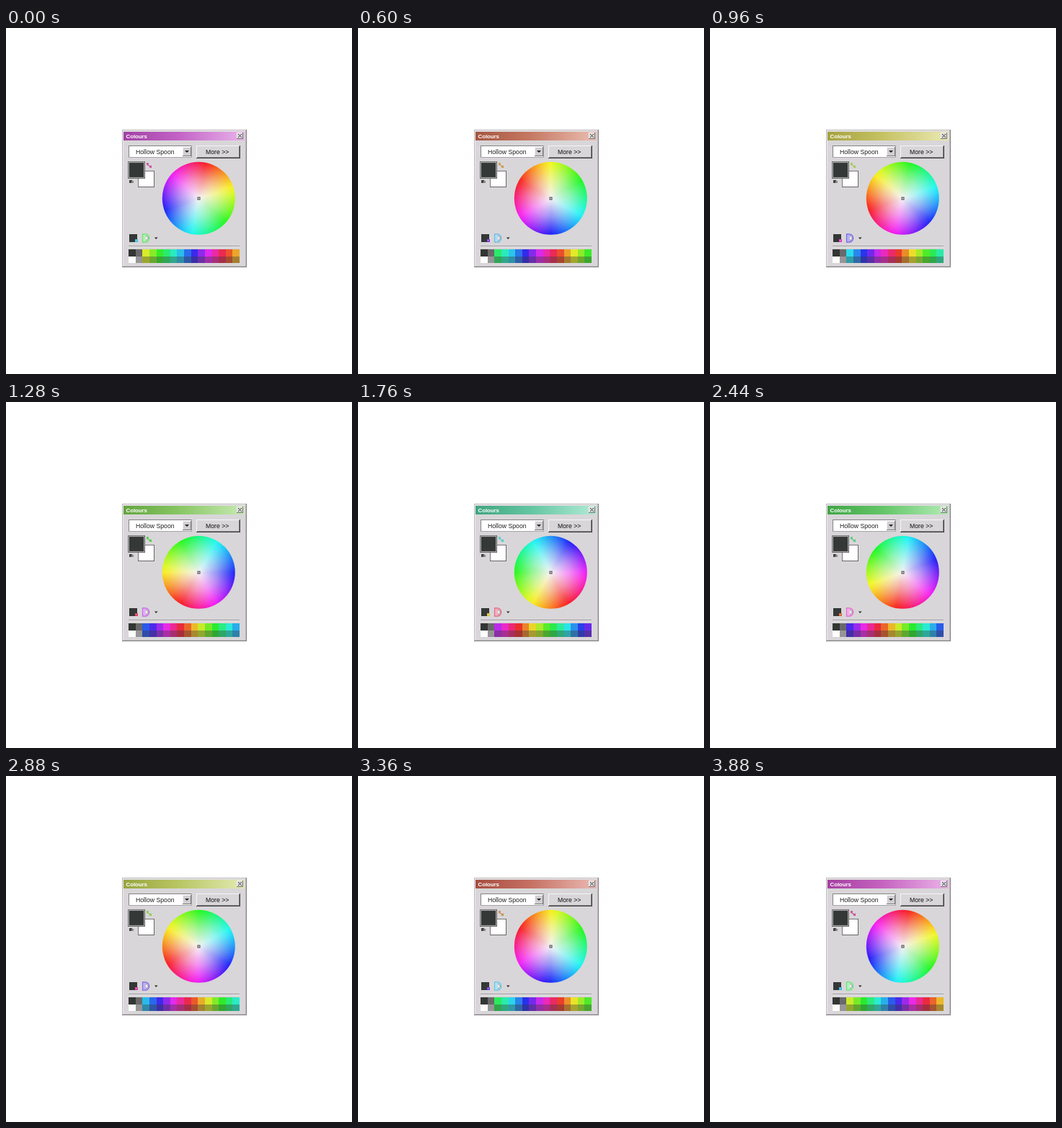
Write an HTML page with a canvas that moves like this. It is 480 by 480 pixels and loops after 3920 ms.

```html
<!DOCTYPE html>
<html lang="en">
<head>
<meta charset="utf-8">
<title>Colour palette</title>
<style>
html, body { margin: 0; width: 100%; height: 100%; overflow: hidden; background: #fff; }
canvas { display: block; }
</style>
</head>
<body>
<canvas id="stage" width="480" height="480"></canvas>
<script>
const ctx = document.getElementById('stage').getContext('2d');
const STEP = 40, STEPS = 98;
const FACE = '#d8d6d8', DARK = '#343837';
const FONT = '"Liberation Sans", Arial, sans-serif';

const hsl = (h, s, l) => `hsl(${h % 360} ${s}% ${l}%)`;

function rect(x, y, w, h, color) {
  ctx.fillStyle = color;
  ctx.fillRect(x, y, w, h);
}

function box(x, y, w, h, fill, topLeft, bottomRight) {
  rect(x, y, w, h, bottomRight);
  rect(x, y, w - 1, h - 1, topLeft);
  rect(x + 1, y + 1, w - 2, h - 2, fill);
}

function label(text, x, y, size, color, weight = 'normal') {
  ctx.font = `${weight} ${size}px ${FONT}`;
  ctx.fillStyle = color;
  ctx.fillText(text, x, y);
}

function polygon(color, ...points) {
  ctx.fillStyle = color;
  ctx.beginPath();
  for (const [x, y] of points) ctx.lineTo(x, y);
  ctx.fill();
}

function stroke(color, width, ...points) {
  ctx.strokeStyle = color;
  ctx.lineWidth = width;
  ctx.beginPath();
  for (const [x, y] of points) ctx.lineTo(x, y);
  ctx.stroke();
}

function drawWindow(shift) {
  rect(161, 141, 173, 191, '#858285');
  rect(161, 141, 172, 190, '#bdbabd');
  rect(162, 142, 170, 188, '#eceaec');
  rect(163, 143, 169, 187, FACE);

  const hue = 233 + shift;
  const bar = ctx.createLinearGradient(163, 0, 331, 0);
  bar.addColorStop(0, hsl(hue, 44, 45));
  bar.addColorStop(0.45, hsl(hue, 46, 58));
  bar.addColorStop(1, hsl(hue, 58, 81));
  rect(163, 144, 168, 12, bar);
  label('Colours', 166.5, 153.4, 7.8, '#fff', 'bold');

  box(320, 145, 9, 9, FACE, '#f4f2f4', '#777');
  stroke('#444', 1, [322, 147], [327, 152]);
  stroke('#444', 1, [327, 147], [322, 152]);
}

function drawControls() {
  box(170, 163, 88, 17, '#fff', '#858285', '#a5a3a5');
  box(245, 165, 12, 13, '#d0ced0', '#f0eef0', '#777');
  polygon('#222', [248, 170], [254, 170], [251, 173]);
  label('Hollow Spoon', 180, 175, 8.7, '#222');

  box(264, 163, 61, 18, '#777', '#f6f4f6', '#444');
  rect(265, 164, 58, 15, FACE);
  label('More >>', 277, 175, 8.7, '#111');
}

function drawSwatches(shift) {
  box(183, 198, 23, 23, '#fff', '#777', '#666');
  box(169, 185, 24, 24, '#aaa8aa', '#777', '#666');
  rect(171, 187, 20, 20, DARK);

  const swap = hsl(255 + shift, 58, 52);
  stroke(swap, 1.1, [196, 189], [201, 193]);
  polygon(swap, [195, 187], [198.5, 187.5], [195.5, 191]);
  polygon(swap, [202, 194], [198.5, 193.5], [201.5, 190]);

  rect(171, 211, 4, 4, '#444');
  rect(174, 212, 3, 3, '#888');
}

function drawWheel(shift) {
  const cx = 267.3, cy = 236.3, radius = 50.5;
  const hues = ctx.createConicGradient(0, cx, cy);
  for (let i = 0; i <= 36; i++) {
    hues.addColorStop(i / 36, hsl(12 + shift + i * 10, 94, 54));
  }
  const fade = ctx.createRadialGradient(cx, cy, 0, cx, cy, radius);
  fade.addColorStop(0, 'rgba(244,242,244,1)');
  fade.addColorStop(0.5, 'rgba(244,242,244,.55)');
  fade.addColorStop(1, 'rgba(244,242,244,0)');

  ctx.beginPath();
  ctx.arc(cx, cy, radius, 0, Math.PI * 2);
  ctx.fillStyle = hues;
  ctx.fill();
  ctx.fillStyle = fade;
  ctx.fill();

  rect(265.5, 234.5, 4, 4, '#444');
  rect(266.5, 235.5, 2, 2, '#ddd');
}

function drawTools(shift) {
  rect(171, 286, 11, 11, DARK);
  rect(179, 293, 4, 4, hsl(125 + shift, 72, 56));
  rect(180, 294, 1, 1, '#ddd');

  const hue = 60 + shift;
  ctx.beginPath();
  ctx.arc(193, 291.5, 5.7, -Math.PI / 2, Math.PI / 2);
  ctx.lineTo(189.5, 297.2);
  ctx.lineTo(189.5, 285.8);
  ctx.closePath();
  ctx.fillStyle = hsl(hue, 70, 82);
  ctx.fill();
  ctx.strokeStyle = hsl(hue, 68, 65);
  ctx.lineWidth = 1.2;
  ctx.stroke();
  rect(194, 289, 3, 5, '#efedef');
  stroke('#858285', 0.9, [194, 288], [198, 291.5], [194, 295]);

  polygon('#222', [206, 290.5], [210.5, 290.5], [208.2, 293]);
  rect(170, 302, 154, 1, '#999799');
  rect(170, 303, 154, 1, '#eceaec');
}

function drawPalette(shift) {
  const left = 170, size = 154 / 16;
  const cell = (column, y, h, color) => {
    const x = Math.round(left + column * size);
    rect(x, y, Math.round(left + (column + 1) * size) - x, h, color);
  };
  const pair = (column, top, bottom) => {
    cell(column, 307, 10, top);
    cell(column, 317, 9, bottom);
  };
  pair(0, '#333634', '#fdfdfd');
  pair(1, '#696969', '#979597');
  for (let i = 0; i < 14; i++) {
    const hue = shift + i * 360 / 14;
    pair(i + 2, hsl(hue, 82, 54), hsl(hue, 56, 42));
  }
}

function frame() {
  const step = Math.floor(performance.now() / STEP) % STEPS;
  // Hue turns 5 degrees per step, forwards then back.
  const shift = 65 + 5 * Math.min(step, STEPS - step);
  rect(0, 0, 480, 480, '#fff');
  drawWindow(shift);
  drawControls();
  drawSwatches(shift);
  drawWheel(shift);
  drawTools(shift);
  drawPalette(shift);
  requestAnimationFrame(frame);
}
frame();
</script>
</body>
</html>
```
